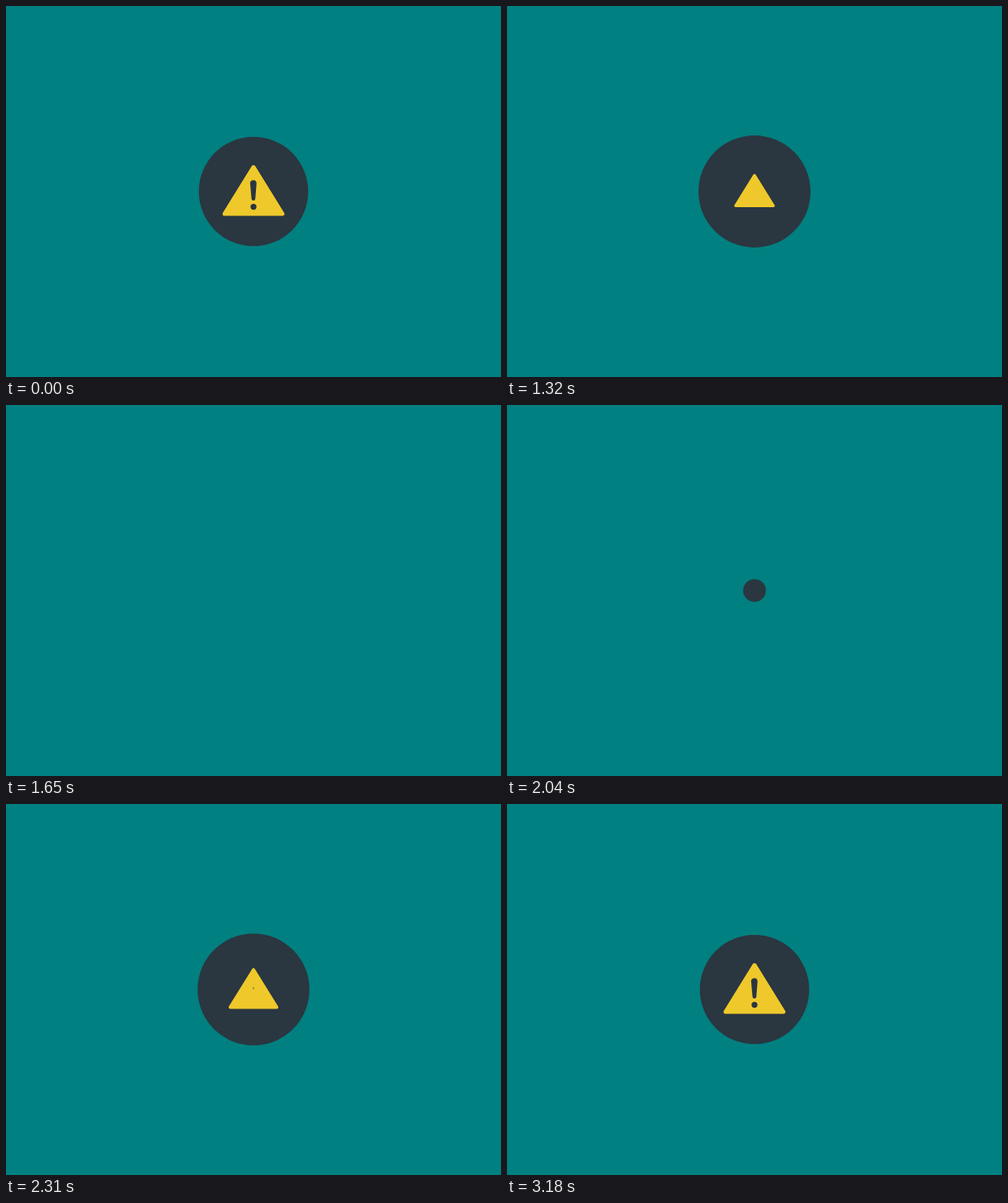
Write an HTML page that moves like this. It is 600 by 450 pixels and loops after 3.6 s.

```html
<!DOCTYPE html>
<html lang="en">
<head>
<meta charset="utf-8">
<title>Warning icon</title>
<style>
  html, body { margin: 0; width: 100%; height: 100%; overflow: hidden; background: #008080; }
  svg { display: block; width: 100%; height: 100%; }
</style>
</head>
<body>
<svg viewBox="0 0 600 450">
  <circle id="disc" cx="300" cy="225" r="66.3" fill="#2a3640"/>
  <path id="sign" d="M300 195.7 L334.9 252 H265.1 Z" fill="#efc92b" stroke="#efc92b" stroke-width="5.2" stroke-linejoin="round"/>
  <path id="bar" d="M295.9 215 C295.9 212.6 297.5 211.2 299.8 211.2 S303.7 212.6 303.7 215 L302.2 234 Q301.9 236.1 299.9 236.1 T297.6 234 Z" fill="#2a3640"/>
  <circle id="dot" cx="300" cy="243.6" r="3.6" fill="#2a3640"/>
</svg>
<script>
const LOOP = 3600;

// Each part pops in: grow to the peak scale, then settle back to 1.
const parts = [
  { id: 'disc', y: 225,   start: 1954, grow: 300, peak: 1.025 },
  { id: 'sign', y: 224,   start: 2100, grow: 300, peak: 1.02 },
  { id: 'bar',  y: 223.7, start: 2250, grow: 300, peak: 1 },
  { id: 'dot',  y: 243.6, start: 2390, grow: 260, peak: 1 }
].map(p => ({ ...p, node: document.getElementById(p.id) }));

const ease = u => {
  u = Math.min(1, Math.max(0, u));
  return u * u * (3 - 2 * u);
};

function scaleAt(p, t) {
  const u = (t - p.start) / p.grow;
  return p.peak * ease(u) + (1 - p.peak) * ease(u - 1);
}

function draw(ms) {
  const t = ms % LOOP;
  // The exit is the entrance played backwards.
  const pose = Math.max(t, LOOP - t);
  for (const p of parts) {
    const s = scaleAt(p, pose);
    p.node.setAttribute('visibility', s > 0.001 ? 'visible' : 'hidden');
    p.node.setAttribute('transform', `translate(300 ${p.y}) scale(${s}) translate(-300 ${-p.y})`);
  }
}

function tick() {
  draw(performance.now());
  requestAnimationFrame(tick);
}
tick();
</script>
</body>
</html>
```
